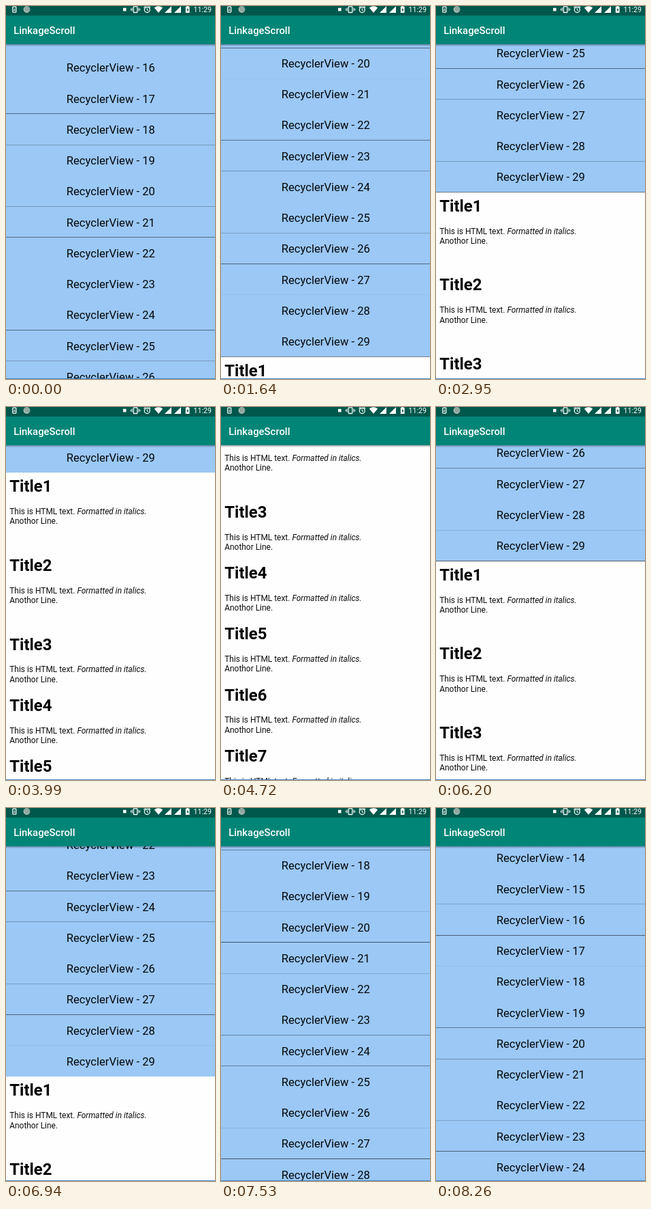
Recreate the animation shown at these times as an HTML page. Size 307 by 546 pixels, loop 9050 ms.

```html
<!DOCTYPE html>
<html lang="en">
<head>
<meta charset="utf-8">
<title>LinkageScroll</title>
<style>
html, body { margin: 0; width: 100%; height: 100%; overflow: hidden; background: #fefefe; }
svg { display: block; width: 100%; height: 100%; font-family: Roboto, "Noto Sans", sans-serif; }
.row { font-size: 16.65px; text-anchor: middle; fill: #05080b; }
.title { font-size: 23.9px; font-weight: 700; fill: #000; }
.body { font-size: 11.94px; fill: #0c0c0c; }
.body tspan { font-style: italic; }
</style>
</head>
<body>
<svg viewBox="0 0 307 546" preserveAspectRatio="none">
  <defs>
    <linearGradient id="shade" x1="0" y1="0" x2="0" y2="1">
      <stop offset="0" stop-color="#000" stop-opacity=".32"/>
      <stop offset="1" stop-color="#000" stop-opacity="0"/>
    </linearGradient>
  </defs>
  <rect width="307" height="546" fill="#fefefe"/>
  <rect id="listBg" width="307" fill="#9bc8f5"/>
  <g id="lines" fill="#000"></g>
  <g id="content"></g>
  <rect y="545" width="307" height="1" fill="#3f85c6"/>

  <rect y="56" width="307" height="3.5" fill="url(#shade)"/>
  <rect y="14" width="307" height="42" fill="#008577"/>
  <rect width="307" height="14" fill="#00574b"/>
  <text x="11.2" y="41" font-size="14.9" font-weight="500" fill="#fff">LinkageScroll</text>

  <g fill="none" stroke="#f2f7f6" stroke-width="1.3">
    <rect x="9.8" y="1.2" width="5" height="8" rx=".8"/>
    <path d="M12.3 3.4v3.4M11 5.6l1.3 1.4 1.3-1.4" stroke-width=".9"/>
    <rect x="187.4" y=".9" width="5.4" height="8.6" rx=".6"/>
    <path d="M185.3 2.6v5M194.9 2.6v5M183.5 3.7v2.8M196.7 3.7v2.8" stroke-width="1.1"/>
    <circle cx="207.3" cy="5.5" r="4"/>
    <path d="M207.3 3.2v2.5l1.7 1M202.4 2.5l2.5-2.1M212.2 2.5l-2.5-2.1" stroke-width="1.1"/>
  </g>
  <circle cx="30.5" cy="5" r="5" fill="#8fa8a2"/>
  <path d="M27 3.2a4 4 0 0 0 6 5" fill="none" stroke="#bccbc7" stroke-width=".9"/>
  <g fill="#fff">
    <rect x="172" y="2.8" width="4.6" height="4.6"/>
    <path d="M217.8 2.6q6.2-4.8 12.4 0L224 10z"/>
    <path d="M243 .2V10h-10zM257 .2V10h-10z"/>
    <path d="M263.8 1h1.5V0h2.8v1h1.5v9h-5.8z"/>
    <path d="M267.2 2.6l-2 3.6h1.3v2.4l2-3.7h-1.3z" fill="#00574b"/>
    <text x="275.6" y="9.2" font-size="10.6">11:29</text>
  </g>
</svg>
<script>
const NS = "http://www.w3.org/2000/svg";
const LOOP = 9050, START = 740, TICK = 147.25;
const ROWS = 30, ROW_H = 45.24;

// [tick, y of the list's lower edge]
const PATH = [
  [-1, 700.36], [6, 512.91], [7, 512.91], [13, 300], [14, 300],
  [15, 272.07], [19, 132], [20, 132], [22, 95.5], [28, -110],
  [33, 120.14], [37, 225], [38, 225], [42, 392.62], [51, 773.75]
];

const byId = id => document.getElementById(id);
const listBg = byId("listBg"), content = byId("content"), lines = byId("lines");

function add(parent, tag, attrs, text = "") {
  const el = document.createElementNS(NS, tag);
  for (const name in attrs) el.setAttribute(name, attrs[name]);
  el.textContent = text;
  return parent.appendChild(el);
}

// List rows sit above the edge (y = 0), the HTML text below it.
const dividers = [];
for (let k = 0; k < ROWS; k++) {
  add(content, "text", { class: "row", x: 153.8, y: -15.8 - k * ROW_H }, `RecyclerView - ${ROWS - 1 - k}`);
  dividers.push(add(lines, "rect", { width: 307, height: 1 }));
}

for (let n = 1, y = 0; n <= 10; n++) {
  add(content, "text", { class: "title", x: 5.3, y: y + 28.8 }, `Title${n}`);
  const first = add(content, "text", { class: "body", x: 5.2, y: y + 61.7 }, "This is HTML text. ");
  add(first, "tspan", {}, "Formatted in italics.");
  add(content, "text", { class: "body", x: 5.2, y: y + 75.9 }, "Anothor Line.");
  y += n < 3 ? 115.6 : 89.2;
}

const slope = i => (PATH[i + 1][1] - PATH[i][1]) / (PATH[i + 1][0] - PATH[i][0]);

function tangent(i) {
  if (i === 0 || i === PATH.length - 1) return 0;
  const a = slope(i - 1), b = slope(i);
  return a * b > 0 ? 2 * a * b / (a + b) : 0;
}

// Smooth curve through PATH that never overshoots its points
function edgeAt(tick) {
  const last = PATH.length - 1;
  if (tick <= PATH[0][0]) return PATH[0][1];
  if (tick >= PATH[last][0]) return PATH[last][1];
  let i = 0;
  while (tick >= PATH[i + 1][0]) i++;
  const [t0, y0] = PATH[i], [t1, y1] = PATH[i + 1];
  const span = t1 - t0, u = (tick - t0) / span, v = 1 - u;
  return y0 * v * v * (1 + 2 * u) + y1 * u * u * (3 - 2 * u)
    + span * u * v * (v * tangent(i) - u * tangent(i + 1));
}

function draw(time) {
  const tick = Math.max(-1, Math.floor((time % LOOP - START) / TICK));
  const edge = edgeAt(tick);
  listBg.setAttribute("height", Math.max(0, edge + 0.5));
  content.setAttribute("transform", `translate(0 ${edge})`);
  dividers.forEach((line, k) => {
    // Hairlines fade as they fall between pixel rows.
    const phase = edge - k * 2 / 7;
    const off = Math.abs(phase - Math.round(phase));
    line.setAttribute("y", Math.round(edge - k * ROW_H));
    line.setAttribute("opacity", Math.max(0, 0.58 * (1 - off / 0.36)));
  });
}

const begin = performance.now();
function frame() {
  draw(performance.now() - begin);
  requestAnimationFrame(frame);
}
frame();
</script>
</body>
</html>
```
